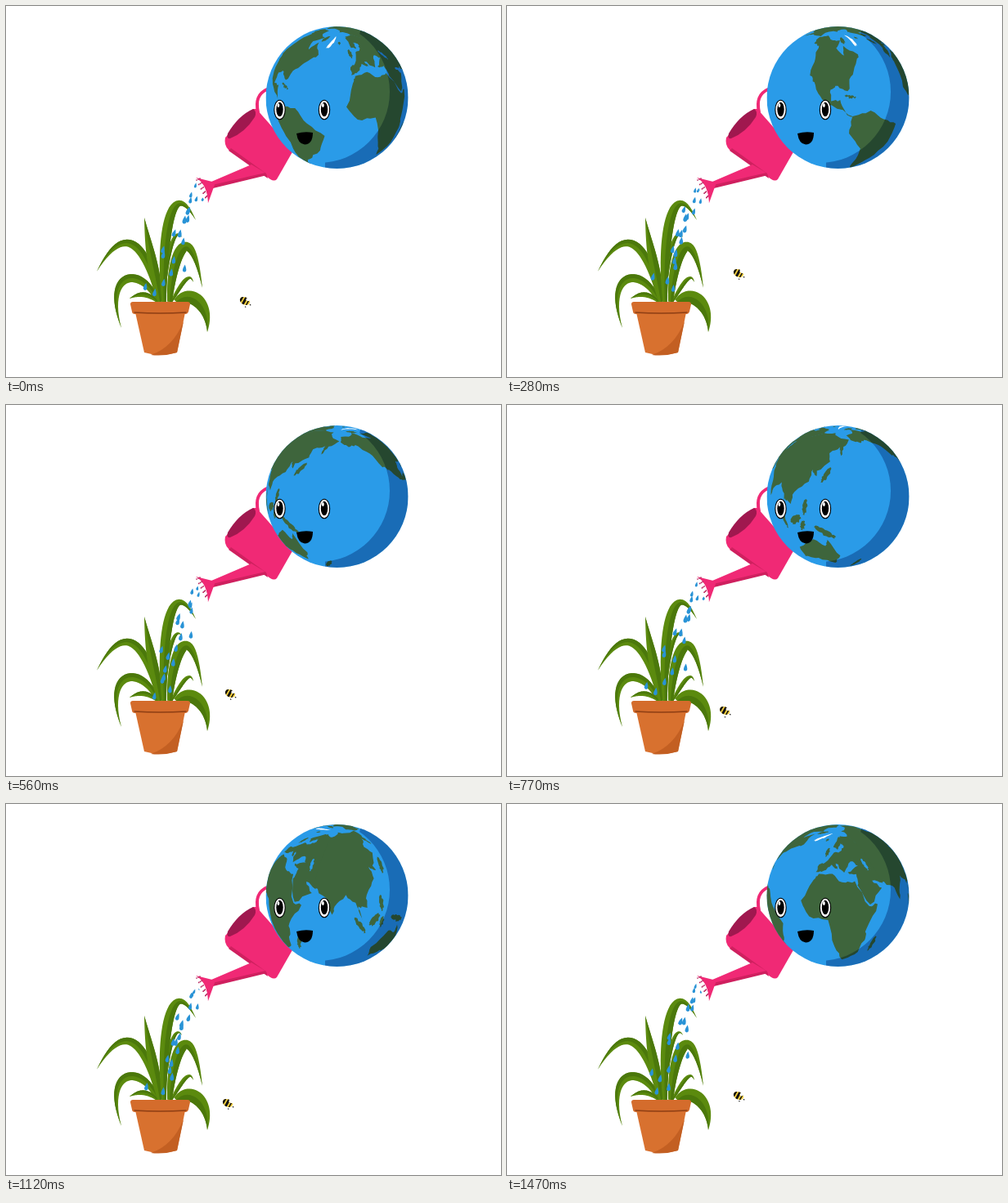
Write an HTML page with a canvas that moves like this. It is 605 by 454 pixels and loops after 1540 ms.

```html
<!DOCTYPE html>
<html lang="en">
<head>
<meta charset="utf-8">
<title>Earth watering a plant</title>
<style>
html, body { margin: 0; width: 100%; height: 100%; overflow: hidden; background: #fff; }
canvas { display: block; }
</style>
</head>
<body>
<canvas id="stage" width="605" height="454"></canvas>
<script>
const ctx = document.getElementById('stage').getContext('2d');
const LOOP = 1540, STEP = 70, RAD = Math.PI / 180;
const GLOBE = { x: 404.5, y: 112, r: 87, tilt: 25 * RAD };
const SEA = '#2a9be8', LAND = '#3e653c', PINK = '#f02975', SHADE = '#cf205f';

// Coarse coastlines as longitude, latitude pairs; region() roughens them
const northAmerica = [-167,65,-156,71,-110,68,-82,68,-94,60,-80,53,-77,62,-56,52,-66,45,-76,36,-81,26,
  -90,30,-97,27,-96,19,-88,20,-83,10,-78,8,-95,16,-106,22,-114,31,-121,35,-124,48,-135,59,-152,59];

function drawAmericas(centre) {
  region(northAmerica, centre);
  region([-78,8,-62,10,-50,1,-35,-7,-40,-21,-55,-35,-66,-45,-70,-54,-74,-45,-70,-20,-81,-5], centre);
}

function drawAfrica(centre) {
  region([-17,15,-9,31,-5,36,10,37,20,31,33,31,43,12,51,12,40,-4,39,-14,32,-28,20,-34,13,-18,8,4,-8,5], centre);
}

const europe = [-9,37,-8,43,-1,45,9,54,20,55,29,60,22,63,16,57,6,59,14,68,26,71,62,69,62,25,51,29,59,22,
  44,13,35,28,36,36,27,38,41,42,33,46,23,38,13,45,17,39,8,44,0,39];

const asia = [60,69,100,76,140,73,190,66,163,60,156,52,155,60,136,54,140,47,127,39,127,35,121,39,121,30,
  109,20,108,11,100,13,103,2,98,16,90,22,80,14,78,8,72,20,60,26];

function drawOceania(centre) {
  region([114,-23,130,-12,140,-17,142,-11,153,-27,148,-38,131,-32,115,-34], centre);
}

// longitude, latitude, half width, half height, slant
const islands = [
  [-2,54,3,4,0], [-18,65,4,1.5,0], [138,37,3,6,.6], [114,1,5,4,.3], [101,-1,2,7,-.7], [121,-2,2,4,.2],
  [140,-5,9,3,-.4], [122,12,2,6,0], [47,-19,2,7,.3], [172,-41,3,7,.5], [-79,22,5,1,-.2], [-73,68,8,4,0]
];

// time, central longitude, bee x, bee y
const poses = [
  [0, -25, 292, 361], [280, -90, 283, 327], [560, -178, 274, 353], [910, -230, 261, 388],
  [1120, -278, 271, 366], [1260, -316, 290, 355], [1470, -344, 283, 357], [LOOP, -385, 292, 361]
];

function poseAt(t) {
  const i = poses.findIndex(p => p[0] > t), a = poses[i - 1], b = poses[i];
  const k = (t - a[0]) / (b[0] - a[0]);
  return a.map((v, j) => v + (b[j] - v) * k);
}

function random(seed) {
  const v = Math.sin(seed * 127.1 + 31.7) * 43758.5453;
  return v - Math.floor(v);
}

function fill(d, color) {
  ctx.fillStyle = color;
  ctx.fill(new Path2D(d));
}

function line(d, color, width) {
  ctx.strokeStyle = color;
  ctx.lineWidth = width;
  ctx.lineCap = 'round';
  ctx.stroke(new Path2D(d));
}

function ellipse(x, y, rx, ry, color, turn = 0) {
  ctx.fillStyle = color;
  ctx.beginPath();
  ctx.ellipse(x, y, rx, ry, turn, 0, 7);
  ctx.fill();
}

// Tapered blade along a cubic spine, one half darker
function leaf(width, ...p) {
  const left = [], mid = [], right = [];
  for (let i = 0; i <= 28; i++) {
    const t = i / 28, u = 1 - t;
    const at = k => u*u*u*p[k] + 3*u*u*t*p[k+2] + 3*u*t*t*p[k+4] + t*t*t*p[k+6];
    const slope = k => u*u*(p[k+2]-p[k]) + 2*u*t*(p[k+4]-p[k+2]) + t*t*(p[k+6]-p[k+4]);
    const x = at(0), y = at(1), dx = slope(0), dy = slope(1);
    const w = width * Math.sin(Math.PI * (0.15 + 0.85 * t)) / Math.hypot(dx, dy);
    mid.push([x, y]);
    left.push([x + dy * w, y - dx * w]);
    right.push([x - dy * w, y + dx * w]);
  }
  const band = (a, b) => 'M' + [...a, ...[...b].reverse()].join('L') + 'Z';
  fill(band(left, right), '#5b8a0e');
  fill(band(mid, right), '#4b780b');
}

function drawPlant() {
  leaf(5, 187,362, 172,290, 145,262, 111,325);
  leaf(5, 186,362, 165,315, 118,325, 141,394);
  leaf(3, 185,362, 172,350, 162,352, 151,358);
  leaf(2.5, 194,350, 196,300, 207,268, 215,283);
  leaf(2.5, 202,362, 212,345, 224,322, 229,338);
  leaf(6, 188,362, 183,330, 175,300, 169,259);
  leaf(6.5, 200,362, 203,300, 225,255, 240,345);
  leaf(6, 193,362, 190,290, 200,200, 232,262);
  leaf(8, 208,362, 225,345, 250,365, 246,399);
  fill('M158 375H219L209 424Q189 430 169 424Z', '#d8712f');
  fill('M177 427Q204 418 217 386L209 424Q193 429 177 427Z', '#c35f22');
  fill('M155 362H222Q225 362 225 365L223 374Q222 377 219 377H158Q154 377 154 374L152 365Q152 362 155 362Z', '#d46c2c');
  line('M157 375Q188 377 220 375', '#8e3f14', 1.3);
}

function drawCan() {
  line('M319 102C308 107 305 116 308 130', PINK, 4);
  fill('M302 126L306 126L351 177L331 212Q328 215 323 212L272 176Q266 170 268 161Z', PINK);
  fill('M275 174L318 205L320 211L272 177Z', SHADE);
  fill('M302 126Q307 129 304 136Q292 155 274 162Q269 163 271 156Q284 134 302 126Z', '#a0184f');
  fill('M300 194L320 206L254 222L251 215Z', PINK);
  fill('M317 204L319 207L253 223L252 219Z', SHADE);
  fill('M232 210L256 216L247 241Z', PINK);
  fill('M232 210Q246 218 247 241Q235 233 232 210Z', '#fff');
  for (let i = 0; i < 15; i++) {
    const row = i % 3, k = Math.floor(i / 3);
    ellipse(233 + k * 2.7 + row * 2 - k * row * 0.3, 213 + k * 5.4 - row, 0.85, 0.85, '#b51d58');
  }
}

function drawDrops(t) {
  for (let i = 0; i < 20; i++) {
    const p = (t / LOOP * 2 + i / 20 + random(i + 40) * 0.04) % 1;
    const side = random(i);
    const x0 = 231 + side * 13, y0 = 216 + side * 18;
    const dx = 163 + random(i * 3 + 7) * 52 - x0, dy = 358 - y0;
    const size = 2.3 + Math.min(p * 5, 1.8) + random(i + 9) * 0.6;
    ctx.save();
    ctx.translate(x0 + dx * p, y0 + dy * Math.pow(p, 1.3));
    ctx.rotate(Math.atan2(-dx * (1 - 0.6 * p), dy * 1.2));
    ctx.scale(size, size);
    fill('M0 -1.2Q.65 .1 .5 .65Q0 1.3 -.5 .65Q-.65 .1 0 -1.2Z', '#2993d6');
    ctx.restore();
  }
}

function project(lon, lat, centre) {
  const a = Math.min(lat * 1.15, 89) * RAD, d = (lon - centre) * RAD;
  const st = Math.sin(GLOBE.tilt), ct = Math.cos(GLOBE.tilt), ca = Math.cos(a);
  let x = ca * Math.sin(d);
  let y = ct * Math.sin(a) - st * ca * Math.cos(d);
  const front = st * Math.sin(a) + ct * ca * Math.cos(d) > 0;
  if (!front) {
    const edge = 1.03 / Math.hypot(x, y);
    x *= edge;
    y *= edge;
  }
  return { x: GLOBE.x + GLOBE.r * x, y: GLOBE.y - GLOBE.r * y, front };
}

function region(shape, centre, color = LAND, rough = 2) {
  const pts = [];
  for (let i = 0; i < shape.length; i += 2) {
    const j = (i + 2) % shape.length;
    for (let k = 0; k < 4; k++) {
      const mix = n => shape[i + n] + (shape[j + n] - shape[i + n]) * k / 4
        + (k ? (random(i * 4 + k + n * 500) - 0.5) * rough : 0);
      pts.push(project(mix(0), mix(1), centre));
    }
  }
  if (!pts.some(p => p.front)) return;
  ctx.beginPath();
  pts.forEach(p => ctx.lineTo(p.x, p.y));
  ctx.fillStyle = color;
  ctx.fill();
}

function island(centre, [lon, lat, w, h, slant], color) {
  const ring = [];
  for (let i = 0; i < 8; i++) {
    const a = i * Math.PI / 4, x = Math.cos(a) * w, y = Math.sin(a) * h;
    ring.push(lon + x + y * slant, lat + y + (w > h ? x * slant : 0));
  }
  region(ring, centre, color, 1.5);
}

function drawEye(x) {
  ellipse(x, 127, 7.2, 12.3, '#000');
  ellipse(x, 127, 6.1, 11.2, '#fff');
  ellipse(x, 126.5, 4.2, 8.8, '#000');
  ellipse(x - 1.6, 121.5, 1.4, 2.6, '#fff');
}

function drawShadow() {
  ctx.globalCompositeOperation = 'multiply';
  ctx.beginPath();
  ctx.rect(300, 20, 200, 185);
  ctx.arc(382, 105, 87, 0, 7);
  ctx.clip('evenodd');
  fill('M436 20H500V205H390V185Z', 'rgb(150,178,200)');
}

function drawGlobe(centre) {
  const { x, y, r } = GLOBE;
  ctx.save();
  ctx.beginPath();
  ctx.arc(x, y, r, 0, 7);
  ctx.clip();
  ctx.fillStyle = SEA;
  ctx.fillRect(x - r, y - r, 2 * r, 2 * r);
  drawAmericas(centre);
  drawAfrica(centre);
  region(europe, centre);
  region(asia, centre);
  drawOceania(centre);
  islands.forEach(s => island(centre, s));
  island(centre, [50, 42, 2, 5, -0.3], SEA);
  island(centre, [-40, 66, 9, 6, 0.5], '#fff');
  drawShadow();
  ctx.restore();
  drawEye(334.5);
  drawEye(389);
  fill('M355 156Q365 153 375 155Q375 169 365 169.5Q357 169 355 156Z', '#000');
}

function drawBee(x, y, t) {
  ctx.save();
  ctx.translate(x, y);
  ctx.rotate(0.5);
  ellipse(0, 0, 6.5, 4.6, '#f4cf3c');
  ctx.save();
  ctx.clip();
  ctx.fillStyle = '#111';
  ctx.fillRect(-7, -5, 3.2, 10);
  ctx.fillRect(-2, -5, 3, 10);
  ctx.fillRect(3, -5, 1.5, 10);
  ctx.restore();
  ellipse(3, -4, 3.2, 2, '#fff', -0.6 + Math.sin(t / 35) * 0.5);
  ellipse(8, 1, 0.9, 0.7, '#222');
  ellipse(4, 6 + Math.sin(t / 90), 0.8, 0.7, '#222');
  ctx.restore();
}

function draw(t) {
  const [, centre, bx, by] = poseAt(t);
  ctx.fillStyle = '#fff';
  ctx.fillRect(0, 0, 605, 454);
  drawPlant();
  drawDrops(t);
  drawCan();
  drawGlobe(centre);
  drawBee(bx, by, t);
}

const start = performance.now();
function tick() {
  const t = Math.max(0, performance.now() - start) % LOOP;
  draw(Math.floor(t / STEP) * STEP);
  requestAnimationFrame(tick);
}
tick();
</script>
</body>
</html>
```
